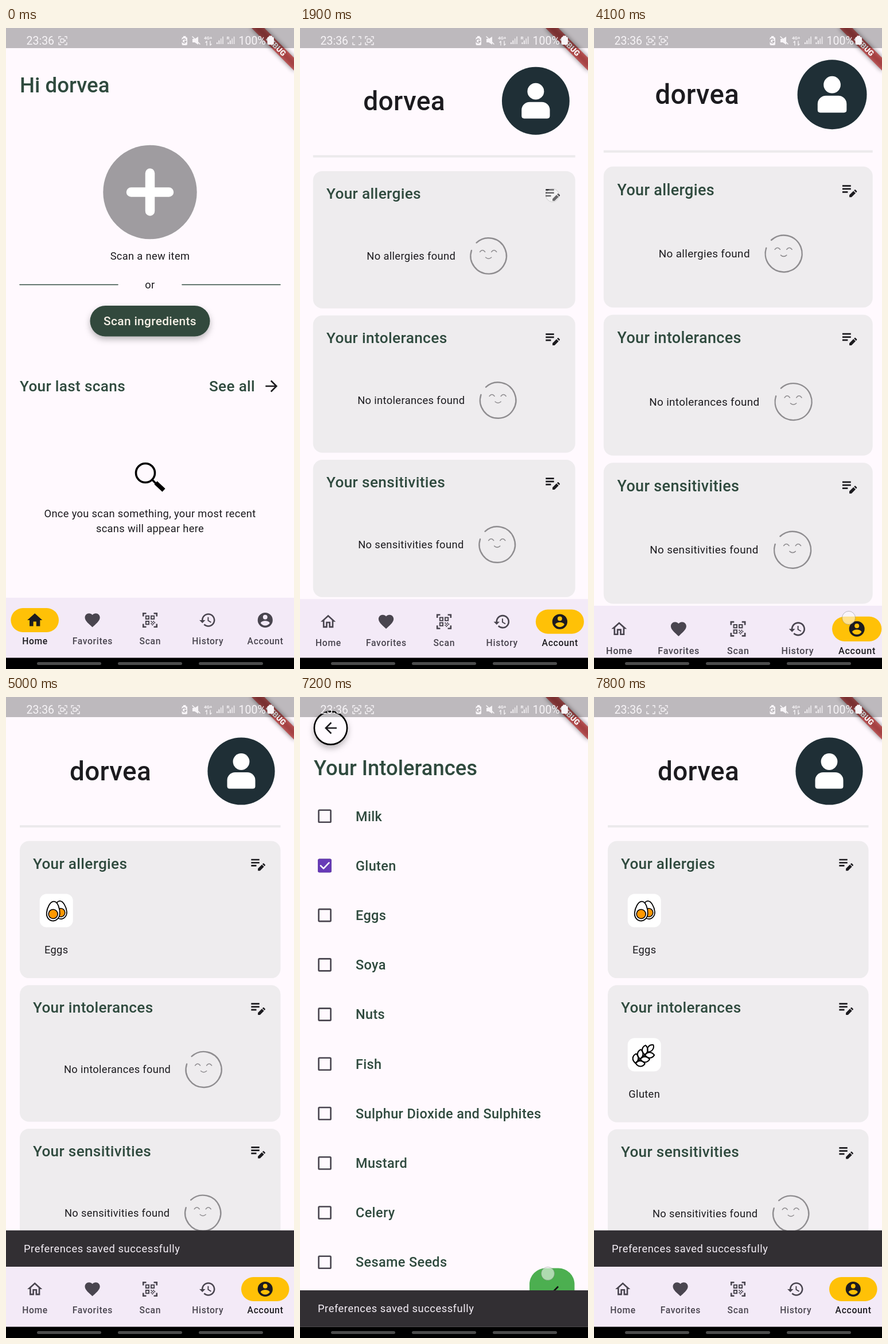
These frames come from a looping animation (502x1115 px, 8000 ms). An HTML page:

```html
<!DOCTYPE html>
<html lang="en">
<head>
<meta charset="utf-8">
<title>Allergy profile</title>
<style>
  html, body { margin: 0; width: 100%; height: 100%; overflow: hidden; background: #000; }
  svg { display: block; font-family: Roboto, sans-serif; }
  .mid { text-anchor: middle; }
  .med { font-weight: 500; }
  .body { font-size: 18.3px; letter-spacing: .33px; fill: #1c1b1f; }
  .line { fill: none; stroke-linecap: round; stroke-linejoin: round; }
</style>
</head>
<body>
<svg id="stage" width="100%" height="100%" viewBox="0 0 502 1115"></svg>
<script>
const LOOP = 8000, PAPER = '#fff9fe', GREEN = '#2f4a3e', INK = '#1c1b1f', GREY = '#49454f';
const DP = 1.307, TRACK = .25 * DP;
const USER = 'dorvea';

// ---------- drawing helpers ----------
const rect = (x, y, w, h, fill, r = 0, more = '') =>
  `<rect x="${x}" y="${y}" width="${w}" height="${h}" rx="${r}" fill="${fill}" ${more}/>`;
const circle = (x, y, r, fill, more = '') => `<circle cx="${x}" cy="${y}" r="${r}" fill="${fill}" ${more}/>`;
const line = (d, colour, w, more = '') => `<path class="line" d="${d}" stroke="${colour}" stroke-width="${w}" ${more}/>`;
const at = (x, y, inner, more = '') => `<g transform="translate(${x} ${y}) ${more}">${inner}</g>`;
const body = (x, y, s, cls = 'mid') => `<text class="body ${cls}" x="${x}" y="${y}">${s}</text>`;
const head = (x, y, size, s, fill = GREEN, track = TRACK, more = '') =>
  `<text class="med" x="${x}" y="${y}" font-size="${size}" fill="${fill}" letter-spacing="${track}" ${more}>${s}</text>`;
const MIDDLE = 'text-anchor="middle"';
// 24-unit icon centred on a point
const icon = (x, y, d, fill) =>
  at(x, y, `<path d="${d}" fill="${fill}"/>`, `scale(${DP}) translate(-12 -12)`);

const PATHS = {
  homeOn: 'M10 20v-6h4v6h5v-8h3L12 3 2 12h3v8z',
  homeOff: 'M12 5.7l5 4.5V18h-2v-6H9v6H7v-7.8l5-4.5M12 3L2 12h3v8h6v-6h2v6h6v-8h3z',
  heart: 'M12 21.35l-1.45-1.32C5.4 15.36 2 12.28 2 8.5 2 5.42 4.42 3 7.5 3c1.74 0 3.41.81 4.5 2.09C13.09 3.81 14.76 3 16.5 3 19.58 3 22 5.42 22 8.5c0 3.78-3.4 6.86-8.55 11.54z',
  history: 'M13 3c-4.97 0-9 4.03-9 9H1l3.9 3.9.1.1 4-4H6c0-3.87 3.13-7 7-7s7 3.13 7 7-3.13 7-7 7c-1.93 0-3.68-.79-4.94-2.06l-1.42 1.42C8.27 19.99 10.51 21 13 21c4.97 0 9-4.03 9-9s-4.03-9-9-9zm-1 5v5l4.28 2.54.72-1.21-3.5-2.08V8z',
  account: 'M12 2a10 10 0 1 0 0 20 10 10 0 0 0 0-20zm0 3a3 3 0 1 1 0 6 3 3 0 0 1 0-6zm0 14.2c-2.5 0-4.71-1.28-6-3.22.03-1.99 4-3.08 6-3.08 1.99 0 5.97 1.09 6 3.08-1.29 1.94-3.5 3.22-6 3.22z',
  edit: 'M3 10h11v2H3zm0-4h11v2H3zm0 8h7v2H3zm15-1.1l.7-.7c.4-.4 1-.4 1.4 0l1.400 1.400c.4.4.4 1 0 1.4l-.7.7zm-.7.7l-5.3 5.3V21.700h2.800l5.3-5.3z',
  back: 'M20 11H7.83l5.59-5.59L12 4l-8 8 8 8 1.41-1.41L7.83 13H20z',
  next: 'M4 13h12.170l-5.590 5.590L12 20l8-8-8-8-1.410 1.410L16.170 11H4z',
  check: 'M9 16.17L4.83 12l-1.42 1.41L9 19 21 7l-1.41-1.41z'
};

const scanIcon = (x, y) => at(x, y, `<g fill="none" stroke="${GREY}">
  <path stroke-width="2" d="M3 7V3h4M17 3h4v4M21 17v4h-4M7 21H3v-4"/>
  <path stroke-width="1.5" d="M6.500 6.500h4v4h-4zM13.500 6.500h4v4h-4zM6.500 13.500h4v4h-4z"/></g>
  <path fill="${GREY}" d="M13 13h1.500v1.500H13zM14.500 14.500H16V16h-1.500zM16 16h1.500v1.500H16zM16 13h1.500v1.500H16zM13 16h1.500v1.500H13zM17.500 14.500H19V16h-1.500zM14.500 17.500H16V19h-1.500z"/>`,
  `scale(${DP}) translate(-12 -12)`);

function nav(selected) {
  const labels = ['Home', 'Favorites', 'Scan', 'History', 'Account'];
  const glyphs = [selected ? PATHS.homeOff : PATHS.homeOn, PATHS.heart, null, PATHS.history, PATHS.account];
  const pill = (i, id) => at(50.2 * (2 * i + 1), 1030, rect(-41.8, -20.9, 83.6, 41.8, '#ffc107', 20.9, `id="${id}"`));
  return rect(0, 991, 502, 106, '#f3eaf7') +
    pill(0, selected ? 'oldPill' : 'homePill') + (selected ? pill(4, 'newPill') : '') +
    labels.map((s, i) => {
      const x = 50.2 * (2 * i + 1), fill = i === selected ? INK : GREY;
      return (glyphs[i] ? icon(x, 1030, glyphs[i], fill) : scanIcon(x, 1030)) +
        head(x + .3, 1072, 12 * DP, s, fill, .5 * DP, MIDDLE);
    }).join('');
}

// ---------- pages ----------
const home = rect(0, 0, 502, 1096, PAPER) +
  head(24, 112, 28 * DP, 'Hi ' + USER, GREEN, 0) +
  circle(251, 285.5, 81.7, '#9f9ca0') +
  line('M218 285.500h66M251 252.500v66', '#fff', 16.5) +
  body(251, 403, 'Scan a new item') +
  line('M24 446.500H195M307 446.500H478', GREEN, 1.6) + body(251, 453, 'or') +
  rect(146.5, 483, 209, 53.5, '#324a3e', 26.7, 'filter="url(#lift)"') +
  head(251, 517, 16 * DP, 'Scan ingredients', '#f5f0e6', TRACK, MIDDLE) +
  head(24, 632, 20 * DP, 'Your last scans') + head(354, 632, 20 * DP, 'See all') +
  icon(462.8, 623, PATHS.next, INK) +
  circle(243, 774, 16.5, 'none', 'stroke="#000" stroke-width="3.6"') +
  line('M255 786l6 6', '#000', 3.4) +
  '<path d="M261 791l14 13" stroke="#000" stroke-width="7.5"/>' +
  body(251, 851, 'Once you scan something, your most recent') +
  body(251, 877, 'scans will appear here') + nav(0);

const smiley = x => at(x, 146.8, line('M-29.500-9.500A31 31 0 1 0-21-22.800', '#8f8d90', 2.4) +
  line('M-15-7q4.500-6 9 0M5-7q4.500-6 9 0M-5 2.500q5 4.500 10 0', '#8f8d90', 1.5));

const egg = (x, y, turn) => at(x, y,
  '<path d="M0-17C7-17 11.500-4 11.500 4A11.500 13 0 0 1-11.500 4C-11.500-4-7-17 0-17z" fill="#fff" stroke="#000" stroke-width="1.8"/>' +
  circle(0, 5, 8, '#ff9800', 'stroke="#000" stroke-width="1.6"'), `rotate(${turn})`);
const eggs = at(95, 120, egg(0, 0, -6), 'scale(.92)') + egg(82.5, 122, 4);

const leaf = (x, turn, size = 1) => at(x, 0,
  line('M0 0C3-8 11-9 16-3C13 3 6 5 0 0', '#000', 2.1), `rotate(${turn}) scale(${size} ${turn > 0 ? -size : size})`);
const wheat = at(71, 137, line('M2 0H30', '#000', 2.1) +
  [2, 13, 24].map(x => leaf(x, -34) + leaf(x, 34)).join('') + leaf(31, 0, .95), 'rotate(-42)');

const card = (i, kind, textX, faceX, food, picture) => `<g id="card${i}">
  ${rect(24, 0, 454.5, 237.6, '#eeecee', 16)}
  ${head(47, 48, 20 * DP, 'Your ' + kind)}
  ${icon(439.1, 39, PATHS.edit, INK)}
  <g class="none">${body(textX, 153, `No ${kind} found`, '')}${smiley(faceX)}</g>
  <g class="some">${rect(58.7, 92, 58, 58, '#fff', 12)}${picture}${body(87.7, 195.5, food)}</g></g>`;

const profile = rect(0, 0, 502, 1096, PAPER) +
  head(111, 145, 35 * DP, USER, INK) +
  circle(410, 129, 58.6, '#1f2f36') + circle(410, 112.5, 14.4, '#fff') +
  '<path d="M385.500 155V145a14 14 0 0 1 14-14h21a14 14 0 0 1 14 14v10q0 4.500-4.500 4.500h-40q-4.500 0-4.500-4.500z" fill="#fff"/>' +
  rect(24, 223, 454.5, 4, '#eceaec') +
  card(0, 'allergies', 117, 328.2, 'Eggs', eggs) +
  card(1, 'intolerances', 101, 344.6, 'Gluten', wheat) +
  card(2, 'sensitivities', 102, 343.2, '', '') + nav(4);

const FOODS = ['Milk', 'Gluten', 'Eggs', 'Soya', 'Nuts', 'Fish', 'Sulphur Dioxide and Sulphites',
  'Mustard', 'Celery', 'Sesame Seeds', 'Peanuts'];
const rowY = i => 207.2 + 86.22 * i;
const list = rect(0, 0, 502, 1096, PAPER) +
  circle(53.5, 54, 28.6, '#fffbff', 'stroke="#000" stroke-width="2.6" filter="url(#lift)"') +
  icon(53.5, 54, PATHS.back, INK) +
  head(24, 136, 36.4, '', GREEN, 0, 'id="title"') +
  FOODS.map((s, i) => rect(32.6, rowY(i) - 10.5, 21, 21, 'none', 1.3, `stroke="${GREY}" stroke-width="2.6"`) +
    head(97, rowY(i) + 8.3, 18 * DP, s)).join('') +
  `<g id="tick">${rect(-11.8, -11.8, 23.6, 23.6, '#673ab7', 2.5)}${line('M-7 0l5 5L7.500-5', '#fff', 2.6, 'stroke-linecap="butt"')}</g>` +
  rect(400, 993.5, 78.5, 78.5, '#4caf50', 28) + icon(439.2, 1033, PATHS.check, '#111');

// ---------- system chrome ----------
const W = '#f7f4f7';
const frameIcon = x => at(x, 22, line('M-7-3.500V-7H-3.500M3.500-7H7V-3.500M7 3.500V7H3.500M-3.500 7H-7V3.500', W, 1.4));
const camera = x => rect(x - 4, 19, 6, 6, 'none', 1, `stroke="${W}" stroke-width="1.3"`) +
  `<path d="M${x + 2} 22l3-2v4z" fill="${W}"/>`;
const bars = x => [0, 1, 2, 3].map(i => rect(x + 3.4 * i, 25 - 3.4 * i, 1.8, 3 + 3.4 * i, W, 0, `opacity="${i > 1 ? .75 : 1}"`)).join('');
const status = rect(0, 0, 502, 35, '#000', 0, 'opacity=".26"') + `<g fill="${W}">
  <text x="35.500" y="28.500" font-size="19.5">23:36</text>
  <text x="405.500" y="28.500" font-size="19.5">100%</text>
  <text x="345" y="20" font-size="8" font-weight="700">4G+</text>
  <text x="384.500" y="19.500" font-size="8" font-weight="700">R</text></g>` +
  frameIcon(99) + `<g id="blink">${camera(99)}</g><g id="second">${frameIcon(121) + camera(121)}</g>` +
  rect(306.5, 16, 9.5, 14, W, 2) + rect(309, 14, 4.5, 3, W) + line('M313 20a3.500 3.500 0 1 0 1 3M311 23h3', '#aaa5aa', 1.3) +
  `<path d="M325 19h4l6-4v14l-6-4h-4z" fill="${W}"/>` + line('M325 15l13 13', W, 1.6) +
  line('M350 30v-7l-2 2M356 23v7l2-2', W, 1.3) + bars(367) + bars(386.5) +
  rect(455.5, 15.5, 11.5, 13.5, W, 2) + rect(458.5, 13.5, 5.5, 3, W);

// translucent ribbon over its own blurred shadow
const ribbon = (fill, more) => rect(-52.3, -7.8, 104.6, 15.7, fill, 0, more);
const banner = at(470.6, 31.4, ribbon('#000', 'opacity=".5" filter="url(#blur)"') + ribbon('#b71c1c', 'opacity=".63"') +
  `<text class="mid" y="4.700" font-size="${10.2 * DP}" font-weight="900" fill="#fff">DEBUG</text>`, 'rotate(45)');

const stage = document.getElementById('stage');
stage.innerHTML = `<defs>
  <filter id="lift" x="-30%" y="-30%" width="160%" height="180%"><feDropShadow dx="0" dy="5" stdDeviation="5.5" flood-opacity=".28"/></filter>
  <filter id="blur" x="-20%" y="-120%" width="140%" height="340%"><feGaussianBlur stdDeviation="4"/></filter></defs>
  <g id="home">${home}</g><g id="profile">${profile}</g>
  ${rect(0, 0, 502, 1096, '#000', 0, 'id="scrim"')}
  <g id="list">${list}</g>
  <svg id="snack" width="502">${rect(0, 0, 502, 64, '#322f33')}
    <text id="snackText" x="31" y="38.300" font-size="18.3" letter-spacing=".55" fill="#f5eff7">Preferences saved successfully</text></svg>
  ${rect(0, 1095.5, 502, 20, '#000')}${[54, 195, 336].map(x => rect(x, 1103, 112, 5, '#4c4c4c', 2.5)).join('')}
  ${banner}${status}
  <circle id="dot" r="11.5" fill="#fff" fill-opacity=".55" stroke="#777" stroke-opacity=".45"/>`;

// ---------- motion ----------
const $ = id => document.getElementById(id);
const set = (id, attrs) => { for (const k in attrs) $(id).setAttribute(k, attrs[k]); };
const show = (node, on) => { node.style.display = on ? '' : 'none'; };
const ramp = (v, from, span) => Math.min(1, Math.max(0, (v - from) / span));
const mix = (a, b, k) => a + (b - a) * k;

function bezier(x1, y1, x2, y2) {
  const f = (a, b, u) => 3 * (1 - u) ** 2 * u * a + 3 * (1 - u) * u * u * b + u ** 3;
  return x => {
    let lo = 0, hi = 1;
    for (let i = 0; i < 24; i++) {
      const m = (lo + hi) / 2;
      if (f(x1, x2, m) < x) lo = m; else hi = m;
    }
    return f(y1, y2, (lo + hi) / 2);
  };
}
const standard = bezier(.4, 0, .2, 1);
const launch = bezier(.3, 0, .8, .15), settle = bezier(.208, .82, .25, 1);
const emphasized = p => p < 1 / 6 ? .4 * launch(p * 6) : .4 + .6 * settle((p - 1 / 6) * 1.2);
const zoom = s => `translate(251 548) scale(${s}) translate(-251 -548)`;

const TAB = 645, SNACK = 4200, PAGE = 300, SNACK_H = 48 * DP + .7;
const VISITS = [
  { title: 'Your Allergies', push: 1869, tick: 3200, row: 2, pop: 4019 },
  { title: 'Your Intolerances', push: 5369, tick: 6400, row: 1, pop: 7219 }
];
const SAVED = [4250, 7450, Infinity];
const TAPS = [[640, 458, 1036], [1700, 440, 291], [3000, 222, 380], [4000, 444, 1026],
  [5200, 444, 539], [6200, 220, 293], [7190, 432, 1003]];

function draw(t) {
  show($('home'), t < TAB);
  show($('profile'), t >= TAB);
  set('oldPill', { opacity: 1 - ramp(t, TAB, 100) });
  set('newPill', { transform: `scale(${emphasized(ramp(t, TAB, 500))} 1)`, opacity: ramp(t, TAB, 100) });

  let top = 250.5;
  SAVED.forEach((when, i) => {
    const node = $('card' + i), full = t >= when, h = full ? 238.6 : 237.6;
    node.setAttribute('transform', `translate(0 ${top})`);
    node.firstElementChild.setAttribute('height', h);
    show(node.querySelector('.none'), !full);
    show(node.querySelector('.some'), full);
    top += h + 12.1;
  });

  const v = VISITS[t < 4700 ? 0 : 1];
  const inP = ramp(t, v.push, PAGE), outP = ramp(t, v.pop, PAGE), leaving = t >= v.pop;
  const inZ = emphasized(inP), outZ = emphasized(outP);
  const alpha = leaving ? 1 - ramp(outP, .0825, .125) : ramp(inP, .125, .125);
  set('profile', { transform: zoom(leaving ? 1.1 - .1 * outZ : 1 + .05 * inZ) });
  set('scrim', { opacity: leaving ? 0 : .6 * ramp(inP, .2075, .21) });
  set('list', { transform: zoom(leaving ? 1 - .1 * outZ : .85 + .15 * inZ), opacity: alpha });
  show($('list'), alpha > 0);
  $('title').textContent = v.title;
  set('tick', { transform: `translate(43 ${rowY(v.row)})`, opacity: ramp(t, v.tick, 150) });

  // the snack bar glides between its resting places on the two pages
  const open = ramp(t, SNACK, 250), h = SNACK_H * standard(open);
  const glide = t < 4700 ? 0 : leaving ? 1 - standard(outP) : standard(inP);
  show($('snack'), open > 0);
  set('snack', { y: mix(991, 1095.5, glide) - h, height: h });
  set('snackText', { opacity: ramp(open, .4, .6) });

  show($('blink'), t % 1000 < 500);
  set('second', { opacity: ramp(t, 50, 250) });

  const tap = TAPS.filter(p => p[0] <= t).pop() || [-LOOP, 0, 0];
  set('dot', { cx: tap[1], cy: tap[2], opacity: 1 - ramp(t, tap[0] + 100, 260) });
}

const begin = performance.now();
function tick() {
  draw((performance.now() - begin) % LOOP);
  requestAnimationFrame(tick);
}
tick();
</script>
</body>
</html>
```
